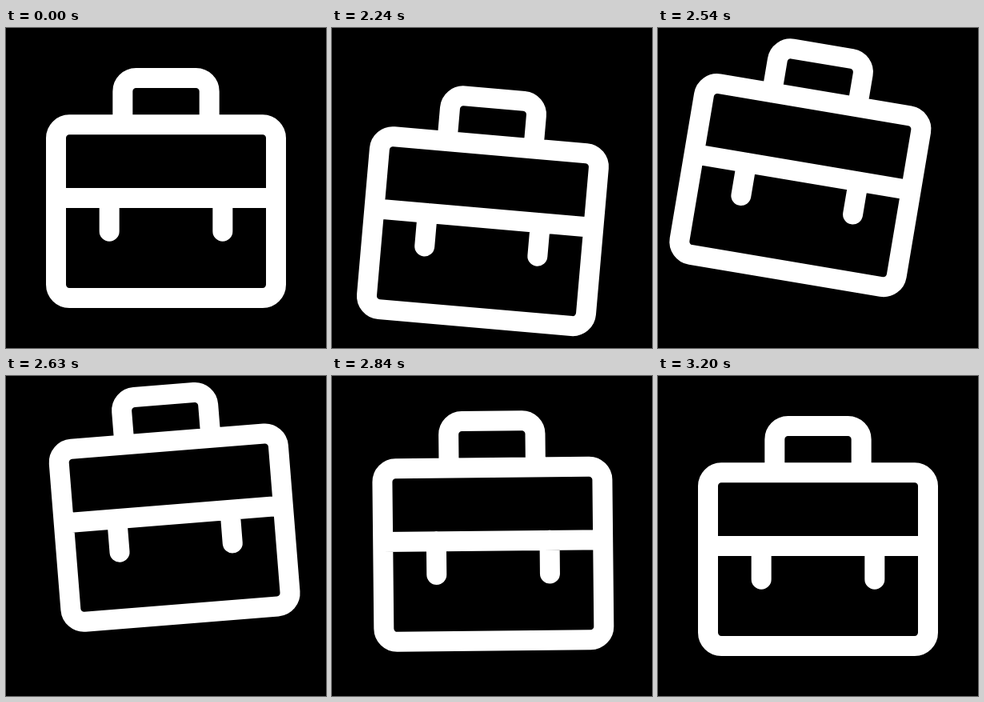
An HTML page with a canvas for the animation above (3.23 s loop, 400 px wide and 400 px high).

```html
<!DOCTYPE html>
<html lang="en">
<head>
<meta charset="utf-8">
<title>Briefcase</title>
<style>
  html, body { margin: 0; width: 100%; height: 100%; overflow: hidden; background: #000; }
  canvas { display: block; width: 100vw; height: 100vh; }
</style>
</head>
<body>
<canvas id="stage" width="400" height="400"></canvas>
<script>
const ctx = document.getElementById('stage').getContext('2d');

const LOOP = 3230;   // ms
const REST = 2000;   // ms of stillness before the jump
const STEP = 30;     // ms per pose
const UNIT = 400 / 24;
const PIVOT = { x: 12, y: 5.75 };

// Keys are [step, value], eased in and out between neighbours.
const LIFT = [[0, 0], [9.8, 28], [20.4, -39.5], [30.6, 0]];
const TILT = [[2.3, 0], [16.1, 13.4], [24.1, -13.6], [31.4, 10], [40, 0]];

function valueAt(keys, step) {
  if (step <= keys[0][0]) return keys[0][1];
  for (let i = 1; i < keys.length; i++) {
    const [start, from] = keys[i - 1];
    const [end, to] = keys[i];
    if (step <= end) {
      const u = (step - start) / (end - start);
      return from + (to - from) * u * u * (3 - 2 * u);
    }
  }
  return keys[keys.length - 1][1];
}

function briefcasePath() {
  const path = new Path2D();
  path.roundRect(3.75, 7.25, 16.5, 13, 1);
  path.moveTo(8.75, 7.25);
  path.arcTo(8.75, 3.75, 12, 3.75, 1);
  path.arcTo(15.25, 3.75, 15.25, 7.25, 1);
  path.lineTo(15.25, 7.25);
  path.moveTo(3.75, 12.75);
  path.lineTo(20.25, 12.75);
  for (const x of [7.75, 16.25]) {
    path.moveTo(x, 12.75);
    path.lineTo(x, 15.25);
  }
  return path;
}

const briefcase = briefcasePath();

function draw(time) {
  const step = Math.max(0, Math.floor((time % LOOP - REST) / STEP));
  ctx.setTransform(1, 0, 0, 1, 0, 0);
  ctx.fillStyle = '#000';
  ctx.fillRect(0, 0, 400, 400);

  ctx.translate(0, valueAt(LIFT, step));
  ctx.scale(UNIT, UNIT);
  ctx.translate(PIVOT.x, PIVOT.y);
  ctx.rotate(valueAt(TILT, step) * Math.PI / 180);
  ctx.translate(-PIVOT.x, -PIVOT.y);
  ctx.strokeStyle = '#fff';
  ctx.lineWidth = 1.5;
  ctx.lineCap = 'round';
  ctx.stroke(briefcase);
}

let origin = null;
function tick(now) {
  origin ??= now;
  draw(now - origin);
  requestAnimationFrame(tick);
}
draw(0);
requestAnimationFrame(tick);
</script>
</body>
</html>
```
